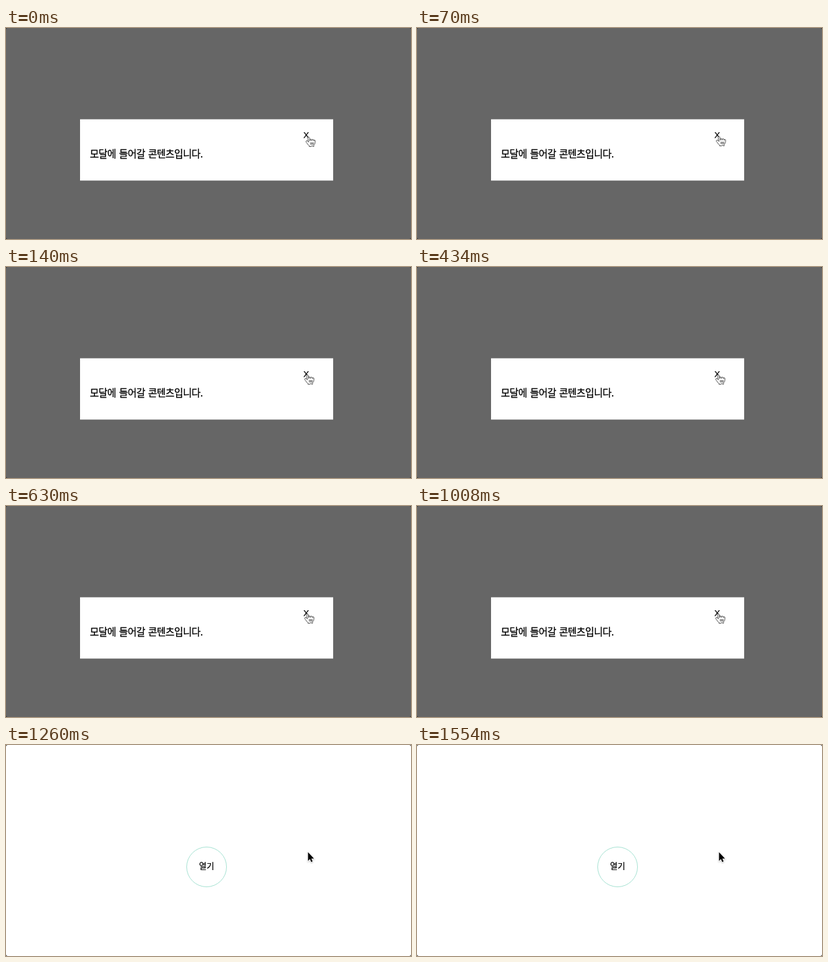
Animation of 640x334 px, one loop 1.75 s. Source, as an HTML page:

```html
<!DOCTYPE html>
<html lang="ko">
<head>
<meta charset="utf-8">
<title>모달</title>
<style>
  html, body { margin: 0; width: 100%; height: 100%; overflow: hidden; background: #333; }
  svg { display: block; width: 640px; height: 334px; }
  text { font-family: "Noto Sans CJK KR", "Noto Sans CJK", sans-serif; stroke: #000; stroke-width: .25; }
  .content { font-size: 15.6px; letter-spacing: -.6px; word-spacing: 1px; }
  .close { font: 13.33px "Liberation Sans", sans-serif; }
  .modal { animation: modal 1750ms step-end infinite; }
  .page { animation: page 1750ms step-end infinite; }
  .hand { animation: approach 1750ms step-end infinite; }
  .arrow { filter: drop-shadow(0 1px 1px rgba(0, 0, 0, .25)); }

  @keyframes modal { 0% { visibility: visible; } 72%, 100% { visibility: hidden; } }
  @keyframes page { 0% { visibility: hidden; } 72%, 100% { visibility: visible; } }
  @keyframes approach {
    0% { transform: translate(465.6px, 164px); }
    4% { transform: translate(464.6px, 163px); }
    8%, 100% { transform: translate(463.6px, 162px); }
  }
</style>
</head>
<body>
<svg viewBox="0 0 640 334">
  <g class="page">
    <rect width="640" height="334" rx="3" fill="#fff"/>
    <circle cx="317" cy="193" r="31.5" fill="none" stroke="#a5e2d2"/>
    <text x="317" y="196.3" font-size="13" text-anchor="middle">열기</text>
    <path class="arrow" d="M477.3 169.8v13.6l3-2.8 2 4.6 2.2-.9-2-4.5h4.2z"
          stroke="#fff" stroke-width="1.6" paint-order="stroke"/>
  </g>
  <g class="modal">
    <rect width="640" height="334" rx="3" fill="#666"/>
    <rect x="117" y="144.5" width="400" height="97" fill="#fff"/>
    <text class="content" x="132.6" y="205.4">모달에 들어갈 콘텐츠입니다.</text>
    <text class="close" x="474.4" y="174" text-anchor="middle">X</text>
    <g class="hand" stroke="#000" stroke-width=".8" stroke-linecap="round" stroke-linejoin="round">
      <path fill="#fff" d="m11.3 20.4c-.3-.4-.6-1.1-1.2-2-.3-.5-1.2-1.5-1.5-1.9-.2-.4-.2-.6-.1-1
        .1-.6.7-1.1 1.4-1.1.5 0 1 .4 1.4.7.2.2.5.6.7.8.2.2.2.3.4.5.2.3.3.5.2.1-.1-.5-.2-1.3-.4-2.1
        -.2-.8-.4-1.6-.6-2.4-.1-.3-.2-1.1-.3-1.5-.1-.5-.1-1.4.3-1.8.3-.3.9-.4 1.3-.2.5.3.8 1 .9 1.3
        .2.5.4 1.2.5 2 .2 1 .5 2.5.5 2.8 0-.4-.1-1.1 0-1.5.1-.3.3-.7.7-.8.3-.1.6-.1.9-.1
        .3.1.6.3.8.5.4.6.4 1.9.4 1.8.1-.4.1-1.2.3-1.6.1-.2.5-.4.7-.5.3-.1.7-.1 1 0
        .2 0 .6.3.7.5.2.3.3 1.3.4 1.7 0 .1.1-.4.3-.7.4-.6 1.8-.8 1.9.6v1.8c0 .5-.1 1.6-.3 2
        -.1.3-.4 1.2-.7 1.6 0 0-1.1 1.2-1.2 1.8-.1.6-.1 1.2 0 1.9 0 0-.8.1-1.2 0
        -.4-.1-.9-.8-1-1.1-.2-.3-.5-.3-.7 0-.2.4-.7 1.1-1.1 1.1-.7.1-2.1 0-3.1 0
        0 0 .2-1-.2-1.4-.3-.3-.8-.8-1.1-1.1z"/>
      <path fill="none" d="M15.9 17.4v3M17.9 17.4v3M19.9 17.4v3"/>
    </g>
  </g>
</svg>
</body>
</html>
```
